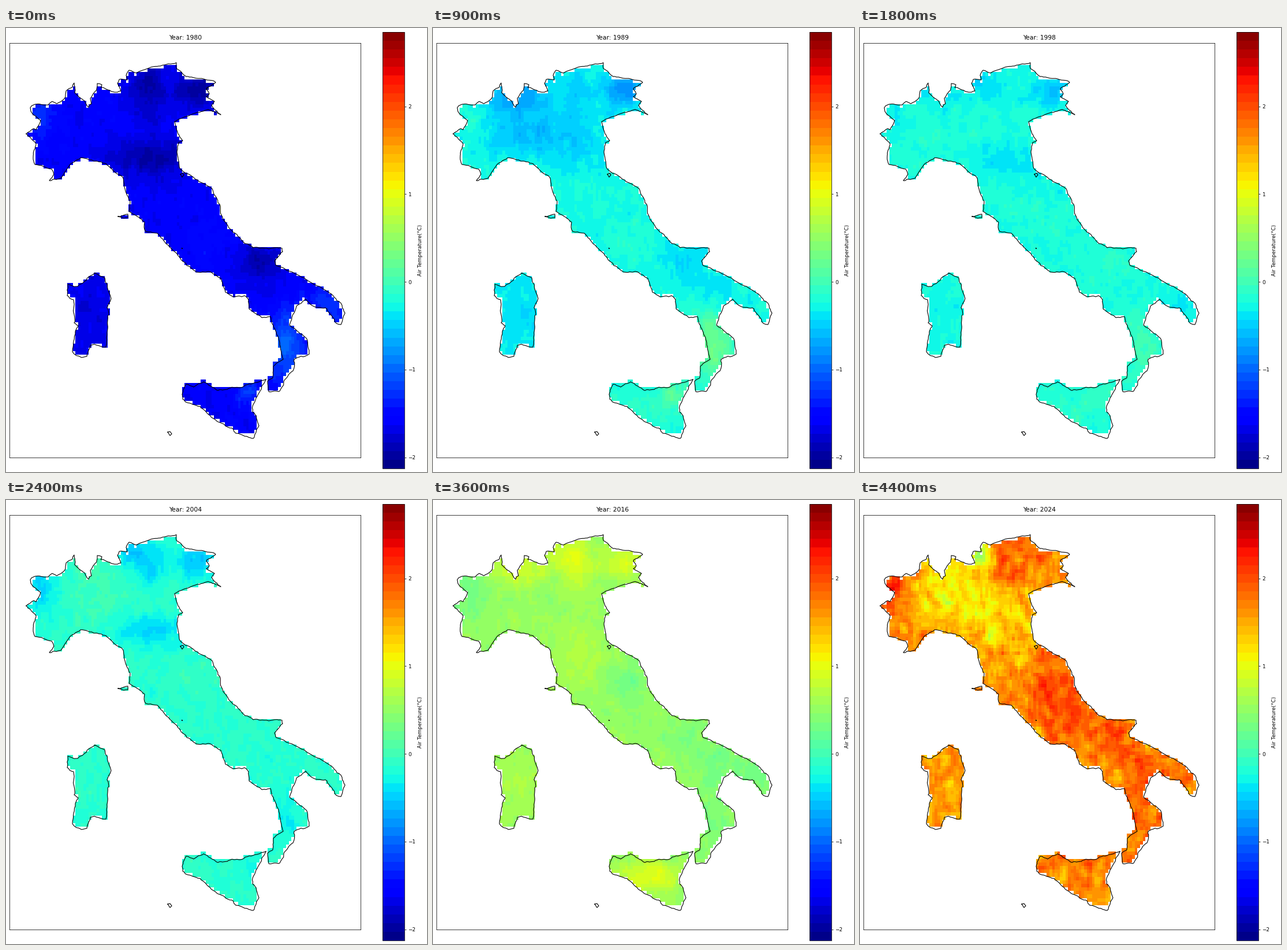
Animation, 729 px wide and 768 px high, one loop 6.8 s. Source, as a matplotlib script:

```python
import matplotlib.pyplot as plt
import numpy as np
from matplotlib.animation import FuncAnimation
from matplotlib.colors import ListedColormap
from matplotlib.path import Path

W, H, DPI = 729, 768, 100
PT = 72 / DPI
FIRST, LAST, FRAMES = 1980, 2024, 68
VMIN, VMAX, BANDS = -2.1285, 2.847, 50
NX, NY = 118, 103
LEFT, RIGHT, TOP, BOTTOM = 36.5, 581.3, 64.3, 700.8

plt.rcParams["font.family"] = "DejaVu Sans"
rng = np.random.default_rng(7)


def coast(*points, rough=0.07):
    """Closed outline through key points, split into a finely wobbling line."""
    def split(a, b):
        length = np.hypot(*(b - a))
        if length < 5:
            return [a]
        mid = (a + b) / 2 + rng.normal(0, rough * min(length, 12), 2)
        return split(a, mid) + split(mid, b)

    p = np.array(points, float)
    ring = [q for a, b in zip(p, np.roll(p, -1, axis=0)) for q in split(a, b)]
    return np.array(ring + ring[:1])


north = [
    (35, 183), (48, 174), (52, 176), (60, 160), (43, 144), (42, 138), (50, 132),
    (73, 133), (80, 127), (88, 131), (102, 121), (104, 109), (115, 102), (118, 95),
    (119, 112), (136, 126), (143, 137), (148, 131), (146, 122), (157, 107), (158, 96),
    (166, 98), (164, 103), (180, 108), (193, 111), (199, 109), (193, 96), (196, 89),
    (210, 90), (208, 82), (213, 73), (226, 78), (243, 71), (281, 62), (295, 60),
    (295, 70), (312, 84), (363, 94), (347, 106), (352, 114), (347, 119), (361, 127),
    (356, 134), (372, 150), (350, 141), (325, 148), (292, 162), (297, 180), (306, 195)]
east = [
    (299, 198), (296, 215), (300, 240), (308, 249), (335, 266), (357, 278), (367, 302),
    (376, 331), (393, 353), (414, 373), (428, 380), (455, 382), (478, 381), (479, 387),
    (465, 403), (468, 411), (512, 431), (557, 456), (580, 476), (587, 493), (580, 513),
    (572, 511), (556, 486), (530, 480), (519, 469), (503, 481), (491, 514), (521, 538),
    (525, 564), (499, 573), (497, 593), (484, 607), (474, 628), (455, 629)]
west = [
    (453, 611), (462, 605), (463, 585), (480, 573), (474, 545), (458, 499), (443, 501),
    (421, 486), (420, 470), (413, 463), (393, 465), (380, 457), (372, 433), (350, 421),
    (330, 422), (313, 411), (262, 355), (242, 352), (240, 336), (213, 317), (215, 300),
    (205, 275), (203, 260), (170, 234), (135, 225), (115, 233), (95, 260), (75, 264),
    (83, 253), (79, 244), (50, 236), (47, 225), (52, 200)]

land = [
    coast(*north, *east, *west),
    coast((154, 424), (171, 432), (182, 468), (175, 484), (178, 495), (173, 552),
          (153, 547), (146, 549), (140, 568), (131, 570), (115, 560), (120, 525),
          (125, 515), (118, 510), (117, 470), (106, 463), (107, 443), (124, 447)),
    coast((450, 608), (407, 622), (367, 627), (342, 612), (325, 621), (312, 616),
          (305, 634), (306, 642), (330, 653), (365, 680), (391, 692), (398, 701),
          (428, 710), (438, 688), (427, 664), (433, 640)),
    coast((194, 326), (211, 322), (211, 328), (204, 329)),
]
islets = [
    coast((280, 699), (284, 698), (287, 702), (284, 705), rough=0),
    coast((302, 253), (306, 251), (308, 254), (305, 258), rough=0),
    coast((304.6, 381), (305.4, 381), (305, 381.8), rough=0),
]

# The drawn grid is slightly tighter than the area its cells were sampled from.
fx, fy = np.meshgrid((np.arange(NX) + 0.5) / NX, (np.arange(NY) + 0.5) / NY)
gx, gy = LEFT + fx * (RIGHT - LEFT), TOP + fy * (BOTTOM - TOP)
sample = np.column_stack([(gx - 1.5 + 5 * fx).ravel(), (gy - 3 + 7 * fy).ravel()])
sea = ~np.any([Path(p).contains_points(sample) for p in land], axis=0).reshape(NY, NX)

# Climate regions as soft spots: centre and spread.
REGIONS = {
    "aosta": (55, 155, 25, 28), "ticino": (145, 115, 42, 26),
    "valtellina": (213, 92, 14, 17), "dolomites": (248, 105, 19, 32),
    "friuli": (330, 108, 27, 20), "plain": (180, 180, 80, 28),
    "emilia": (250, 225, 45, 22), "tuscany": (255, 285, 42, 32),
    "umbria": (330, 315, 27, 23), "abruzzo": (350, 365, 30, 27),
    "molise": (440, 405, 27, 22), "puglia": (490, 457, 27, 22),
    "salento": (560, 480, 28, 20), "calabria": (485, 550, 26, 45),
    "etna": (418, 630, 15, 17), "sicily": (370, 652, 42, 22),
    "sardinia": (145, 500, 40, 60),
}
spots = np.array([np.exp(-((gx - x) / sx) ** 2 / 2 - ((gy - y) / sy) ** 2 / 2)
                  for x, y, sx, sy in REGIONS.values()])

# National level in the warm and cold years between the key patterns.
levels = {1983: -0.6, 1984: -1.0, 1990: -0.2, 1991: -0.9, 1994: 0.3, 1996: -0.7,
          2000: 0.25, 2003: 0.45, 2005: -0.7, 2007: 0.3, 2010: -0.4, 2014: 0.55,
          2018: 0.7, 2021: 0.35, 2022: 1.2}
patterns = {}


def key_year(year, level, grain=0.04, **strength):
    levels[year] = level
    patterns[year] = [grain] + [strength.get(name, 0) for name in REGIONS]


key_year(1980, -1.6, aosta=0.3, dolomites=-0.35, friuli=-0.4, emilia=-0.38,
         abruzzo=0.12, molise=-0.3, salento=0.35, calabria=0.55, etna=0.4,
         sardinia=-0.1)
key_year(1985, -0.45, aosta=0.1, ticino=-0.65, dolomites=-0.6, friuli=-0.9,
         plain=-0.6, emilia=-0.2, abruzzo=0.12, molise=-0.5, puglia=-0.25,
         salento=0.2, calabria=0.55, etna=0.4, sicily=0.12, sardinia=-0.22)
key_year(1993, -0.35, aosta=0.2, ticino=-0.25, dolomites=0.2, friuli=-0.25,
         molise=0.15, puglia=-0.1, salento=-0.2, calabria=0.5, etna=0.3,
         sicily=0.2, sardinia=-0.1)
key_year(2004, -0.13, aosta=-0.4, ticino=0.1, valtellina=-0.4, dolomites=-0.35,
         friuli=-0.4, plain=0.1, emilia=-0.35, umbria=0.08, calabria=-0.12, etna=-0.1)
key_year(2011, 0.15, aosta=0.6, ticino=0.65, valtellina=-0.4, dolomites=0.8,
         friuli=0.65, plain=0.35, emilia=0.3, tuscany=0.2, abruzzo=-0.4,
         molise=0.15, salento=0.1, calabria=-0.5, etna=-0.4, sicily=-0.2,
         sardinia=-0.1)
key_year(2016, 0.5, aosta=-0.25, ticino=0.35, valtellina=0.2, dolomites=0.45,
         friuli=0.45, emilia=0.1, tuscany=0.2, umbria=-0.2, molise=-0.12,
         puglia=-0.2, salento=-0.2, calabria=-0.12, sicily=0.45, sardinia=0.12)
key_year(2024, 1.65, grain=0.15, aosta=0.7, ticino=-0.45, valtellina=-1.0,
         dolomites=0.4, friuli=0.1, plain=-0.55, emilia=-0.3, tuscany=-0.1,
         umbria=0.35, abruzzo=0.3, molise=0.35, puglia=0.3, calabria=0.15,
         sardinia=-0.15)

level_years = sorted(levels)
level_values = [levels[y] for y in level_years]
pattern_years = sorted(patterns)
pattern_values = np.array([patterns[y] for y in pattern_years]).T


def clumpy_noise(seed):
    n = np.random.default_rng(seed).normal(0, 1, (NY + 2, NX + 2))
    return sum(n[j:j + NY, i:i + NX] for j in range(3) for i in range(3)) / 3


def field(year):
    grain, *strength = [np.interp(year, pattern_years, v) for v in pattern_values]
    values = (np.interp(year, level_years, level_values)
              + np.tensordot(strength, spots, 1) + grain * clumpy_noise(year))
    return np.ma.array(np.clip(values, VMIN, VMAX), mask=sea)


def pixel_axes(x0, y0, x1, y1):
    return fig.add_axes([x0 / W, 1 - y1 / H, (x1 - x0) / W, (y1 - y0) / H])


fig = plt.figure(figsize=(W / DPI, H / DPI), dpi=DPI, facecolor="white")
cmap = ListedColormap(plt.get_cmap("jet")((np.arange(BANDS) + 0.5) / BANDS))
ax = pixel_axes(6, 26, 614, 743)
image = ax.imshow(field(FIRST), cmap=cmap, vmin=VMIN, vmax=VMAX,
                  extent=(LEFT, RIGHT, BOTTOM, TOP), aspect="auto",
                  interpolation="nearest")
for ring in land + islets:
    ax.plot(ring[:, 0], ring[:, 1], color="black", lw=1.1 * PT)
ax.set(xlim=(6, 614), ylim=(743, 26), xticks=[], yticks=[])
title = fig.text(310.5 / W, 1 - 20 / H, "", size=10.7 * PT, ha="center", va="baseline")

cax = pixel_axes(652, 7, 690, 762)
bar = fig.colorbar(image, cax=cax, ticks=range(-2, 3))
cax.tick_params(labelsize=8.9 * PT, length=3.1 * PT, width=0.75 * PT, pad=3.1 * PT)
fig.text(717.5 / W, 1 - 384 / H, "Air Temperature(°C)", size=8.9 * PT, rotation=90,
         ha="center", va="center")
for edge in [bar.outline, *ax.spines.values()]:
    edge.set_linewidth(0.75 * PT)


def update(i):
    year = min(FIRST + i, LAST)
    image.set_data(field(year))
    title.set_text(f"Year: {year}")
    return image, title


anim = FuncAnimation(fig, update, frames=FRAMES, interval=100, repeat=True,
                     repeat_delay=0)
plt.show()
```
